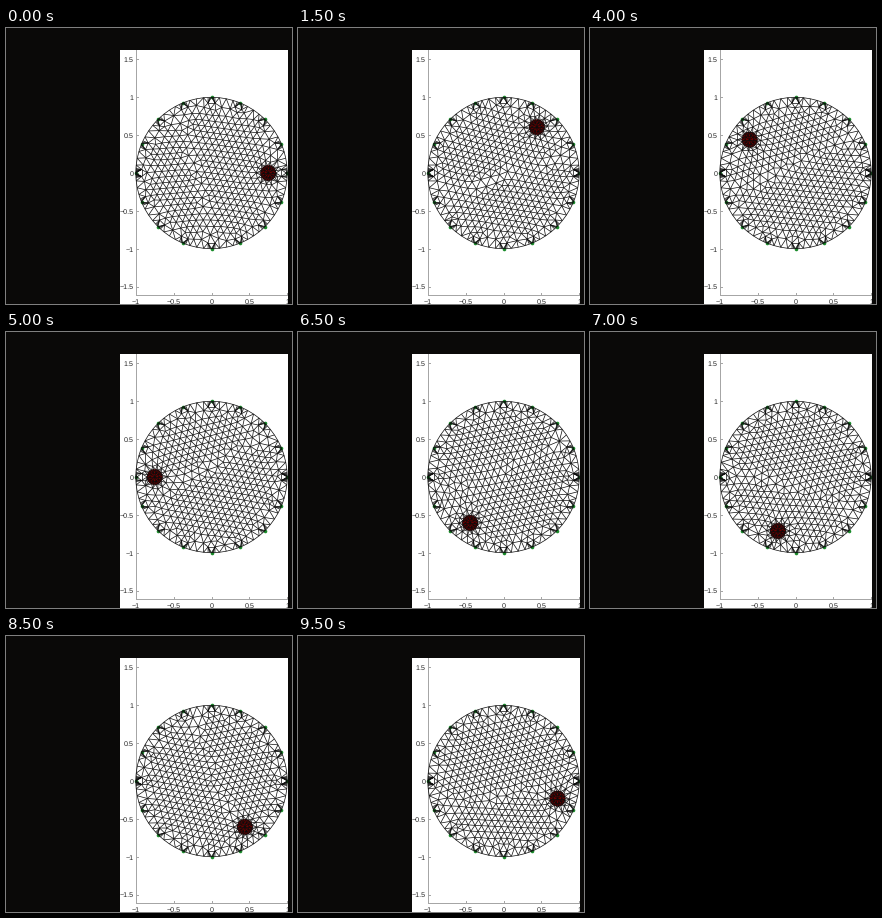
Write a matplotlib script that moves like this. It is 286 px wide and 276 px high and loops after 10000 ms.

```python
import numpy as np
import matplotlib.pyplot as plt
from matplotlib.animation import FuncAnimation
from matplotlib.collections import LineCollection
from matplotlib.patches import Circle, Rectangle
from matplotlib.tri import Triangulation

plt.rcParams["text.hinting"] = "none"

W, H, DPI = 286, 276, 100
FRAMES, INTERVAL = 20, 500
CX, CY, UNIT = 205.5, 145.0, 75.7
PX = 72 / DPI  # one pixel in points
SPACING = 0.087
ORBIT, RADIUS = 0.75, 0.1
BACKDROP = "#0a0908"
ELECTRODES = np.arange(16) * np.pi / 8


def to_px(points):
    return np.array([CX, CY]) + np.asarray(points) * [UNIT, -UNIT]


def polar(radius, angle):
    return np.column_stack([radius * np.cos(angle), radius * np.sin(angle)])


def ring(center, radius, count):
    return center + polar(radius, np.arange(count) * 2 * np.pi / count)


def distance(points, center):
    return np.hypot(*(points - center).T)


def electrode_nodes():
    """Rim nodes crowd at each electrode, so their triangles form dark fans."""
    near = np.array([.011, .023, .045, .105])
    offsets = np.concatenate([-near, [0], near, [np.pi / 16]])
    rim = [polar(1, a + offsets) for a in ELECTRODES]
    fine = np.array([.005, .017, .034, .06])
    rim += [polar(1, a + np.concatenate([-fine, fine])) for a in (0, np.pi)]
    inner = [polar(0.925, a + np.array([-.05, .05])) for a in ELECTRODES]
    return np.vstack(rim), np.vstack(inner)


def hex_grid(tilt):
    i, j = np.meshgrid(np.arange(-16, 17), np.arange(-18, 19))
    x = (i + 0.5 * (j % 2)) * SPACING
    y = j * SPACING * np.sqrt(3) / 2
    return polar(np.hypot(x, y).ravel(), (np.arctan2(y, x) + tilt).ravel())


def lattice(rng, center):
    """Two hexagonal grains that meet along a seam."""
    first, second = rng.uniform(-0.3, 0.3, 2)
    seam = rng.uniform(0, 2 * np.pi)
    normal = np.array([np.cos(seam), np.sin(seam)])
    shift = rng.uniform(-0.2, 0.2)
    a, b = hex_grid(first), hex_grid(second)
    pts = np.vstack([a[a @ normal < shift - 0.03], b[b @ normal > shift + 0.03]])
    return pts[(distance(pts, center) > 0.215) & (distance(pts, 0) < 0.89)]


def smooth(fixed, free, rounds=10):
    pts = np.vstack([fixed, free])
    n = len(fixed)
    for _ in range(rounds):
        a, b = Triangulation(*pts.T).edges.T
        total, count = np.zeros_like(pts), np.zeros(len(pts))
        for p, q in ((a, b), (b, a)):
            np.add.at(total, p, pts[q])
            np.add.at(count, p, 1)
        mean = total / np.maximum(count, 1)[:, None]
        pts[n:] += 0.35 * (mean[n:] - pts[n:])
    return pts


def build_mesh(frame):
    angle = 2 * np.pi * frame / FRAMES
    center = ORBIT * np.array([np.cos(angle), np.sin(angle)])
    rim, fans = electrode_nodes()
    fans = fans[distance(fans, center) > 0.17]
    disc = np.vstack([center[None], ring(center, .055, 10),
                      ring(center, RADIUS, 22)])
    halo = ring(center, .16, 14)
    halo = halo[distance(halo, 0) < 0.93]
    free = np.vstack([halo, lattice(np.random.default_rng(frame), center)])
    pts = smooth(np.vstack([rim, fans, disc]), free)
    return to_px(center), to_px(pts)[Triangulation(*pts.T).edges]


fig = plt.figure(figsize=(W / DPI + 1e-5, H / DPI + 1e-5), dpi=DPI,
                 facecolor=BACKDROP)
ax = fig.add_axes([0, 0, 1, 1])
ax.set(xlim=(0, W), ylim=(H, 0))
ax.axis("off")

panel = Rectangle((114, 22), 168, 254, fc="white", ec="none", zorder=0)
ax.add_patch(panel)

# Axis lines, ticks and labels
axis_style = dict(color="#a6a6a6", lw=PX, zorder=1)
ax.plot([129.5, 129.5], [22, 267.5], **axis_style)
ax.plot([129.5, 282], [267.5, 267.5], **axis_style)
label_style = dict(family="Liberation Sans", size=7.2 * PX, color="#262626")


def label(value):
    return f"{value:g}".replace("-", "\u2212")


for v in np.arange(-1.5, 1.6, 0.5):
    y = CY - v * UNIT
    ax.plot([129.5, 131.5], [y, y], **axis_style)
    ax.text(127.5, y + 0.3, label(v), ha="right", va="center_baseline", **label_style)
for v in np.arange(-1, 1.1, 0.5):
    x = CX + v * UNIT
    ax.plot([x, x], [267.5, 265.5], **axis_style)
    text = ax.text(x, 273.3, label(v), ha="center", va="center_baseline",
                   **label_style)
    text.set_clip_path(panel)

inclusion = Circle((0, 0), RADIUS * UNIT + 0.3, fc="#6a0000", ec="none", zorder=2)
ax.add_patch(inclusion)
ax.plot(*to_px(polar(1, ELECTRODES)).T, "o", ms=3.6 * PX, mew=0,
        color="#1a8a2a", zorder=3)
mesh = LineCollection([], colors="#0c0c0c", linewidths=0.7 * PX, zorder=4)
ax.add_collection(mesh)
ax.add_patch(Rectangle((282, 0), 4, H, fc=BACKDROP, ec="none", zorder=5))


def update(frame):
    center, segments = build_mesh(frame)
    inclusion.center = center
    mesh.set_segments(segments)
    return inclusion, mesh


anim = FuncAnimation(fig, update, frames=FRAMES, interval=INTERVAL,
                     repeat=True, repeat_delay=0, blit=False)
plt.show()
```
